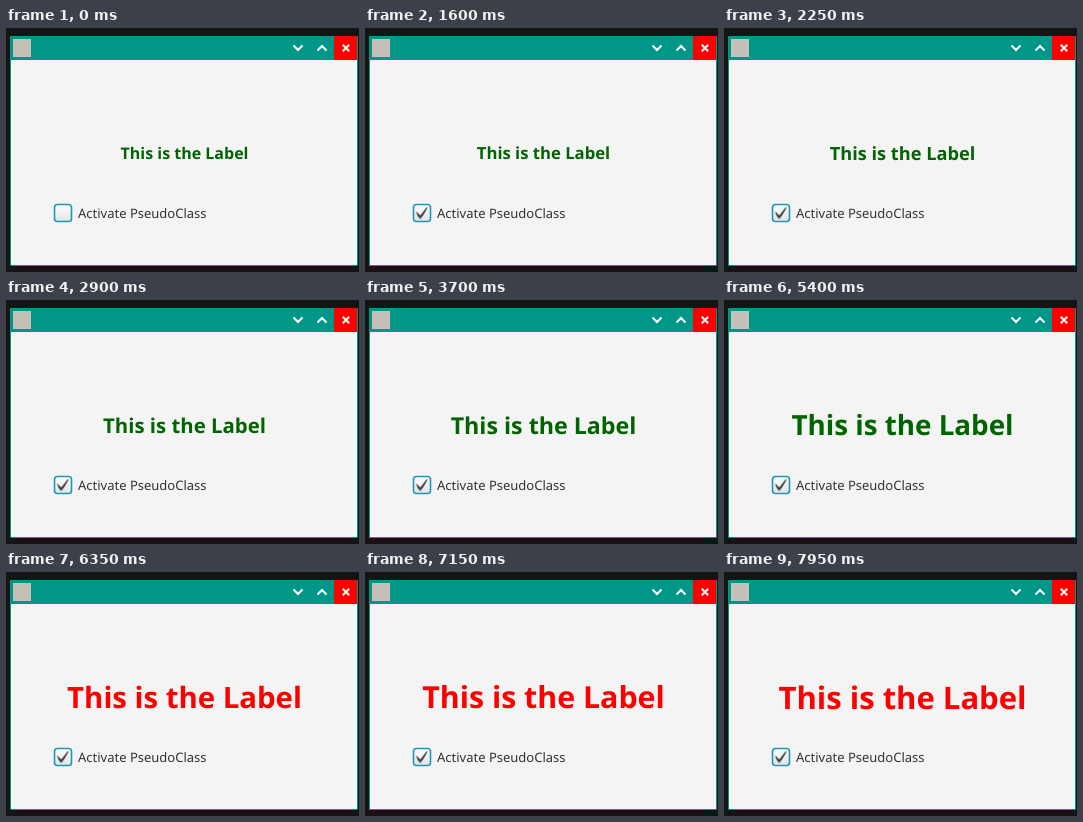
An HTML page for the animation above (8000 ms loop, 353 px wide and 244 px high).

```html
<!DOCTYPE html>
<html lang="en">
<head>
<meta charset="utf-8">
<title>Label transition</title>
<style>
  html, body { margin: 0; width: 100%; height: 100%; overflow: hidden; background: #141414; }
  svg { display: block; width: 353px; height: 244px; }
  text { font-family: "Noto Sans", "Open Sans", sans-serif; text-rendering: geometricPrecision; }
  .icons { fill: none; stroke: #fff; stroke-width: 2; }
  .caption { font-size: 13px; fill: #333; }
  .label {
    font-weight: 700;
    text-anchor: middle;
    animation: grow 8s infinite, redden 8s infinite;
  }
  .tick { fill: #444; animation: tick 8s step-end infinite; }

  /* The first 7 s of a 10 s "ease" from 16px to 32px */
  @keyframes grow {
    0% { font-size: 16px; }
    12.5% { font-size: 16px; animation-timing-function: cubic-bezier(.3014, .0897, .3484, .7851); }
    100% { font-size: 31.05px; }
  }
  @keyframes redden {
    0% { fill: #006400; }
    68.75% { fill: #006400; animation-timing-function: ease; }
    81.25%, 100% { fill: #f00; }
  }
  @keyframes tick {
    0% { opacity: 0; }
    11.875%, 100% { opacity: 1; }
  }
</style>
</head>
<body>
<svg viewBox="0 0 353 244">
  <defs>
    <linearGradient id="face" x2="0" y2="1">
      <stop offset="0" stop-color="#fdfdfd"/>
      <stop offset="1" stop-color="#e4e4e4"/>
    </linearGradient>
  </defs>

  <!-- Window -->
  <rect width="353" height="244" fill="#141414"/>
  <rect x="4" y="8" width="348" height="230" rx="1" fill="#009688"/>
  <rect x="5" y="32" width="346" height="205" fill="#f4f4f4"/>
  <rect x="328" y="8" width="23" height="24" fill="#f00"/>
  <rect x="7" y="11" width="18" height="18" fill="#c4c0b8"/>
  <g class="icons">
    <path d="M287.5 17.5l4.5 4.5 4.5-4.5M311.5 22.5l4.5-4.5 4.5 4.5"/>
    <path d="M336.8 16.8l6.4 6.4m0-6.4l-6.4 6.4"/>
  </g>

  <text class="label" x="178.5" y="125.5" dy=".357em">This is the Label</text>

  <!-- Check box -->
  <rect x="48.5" y="176.5" width="17" height="17" rx="3" fill="url(#face)" stroke="#1c98b4" stroke-width="1.6"/>
  <path class="tick" transform="translate(51.5 179.8) scale(.68)"
    d="M-.25 6.083c.843-.758 4.583 4.833 5.75 4.833S14.5-1.5 15.917-.917c1.292.532-8.75 17.083-10.5 17.083C3 16.167-1.094 6.833-.25 6.083z"/>
  <text class="caption" x="72" y="190">Activate PseudoClass</text>
</svg>
</body>
</html>
```
